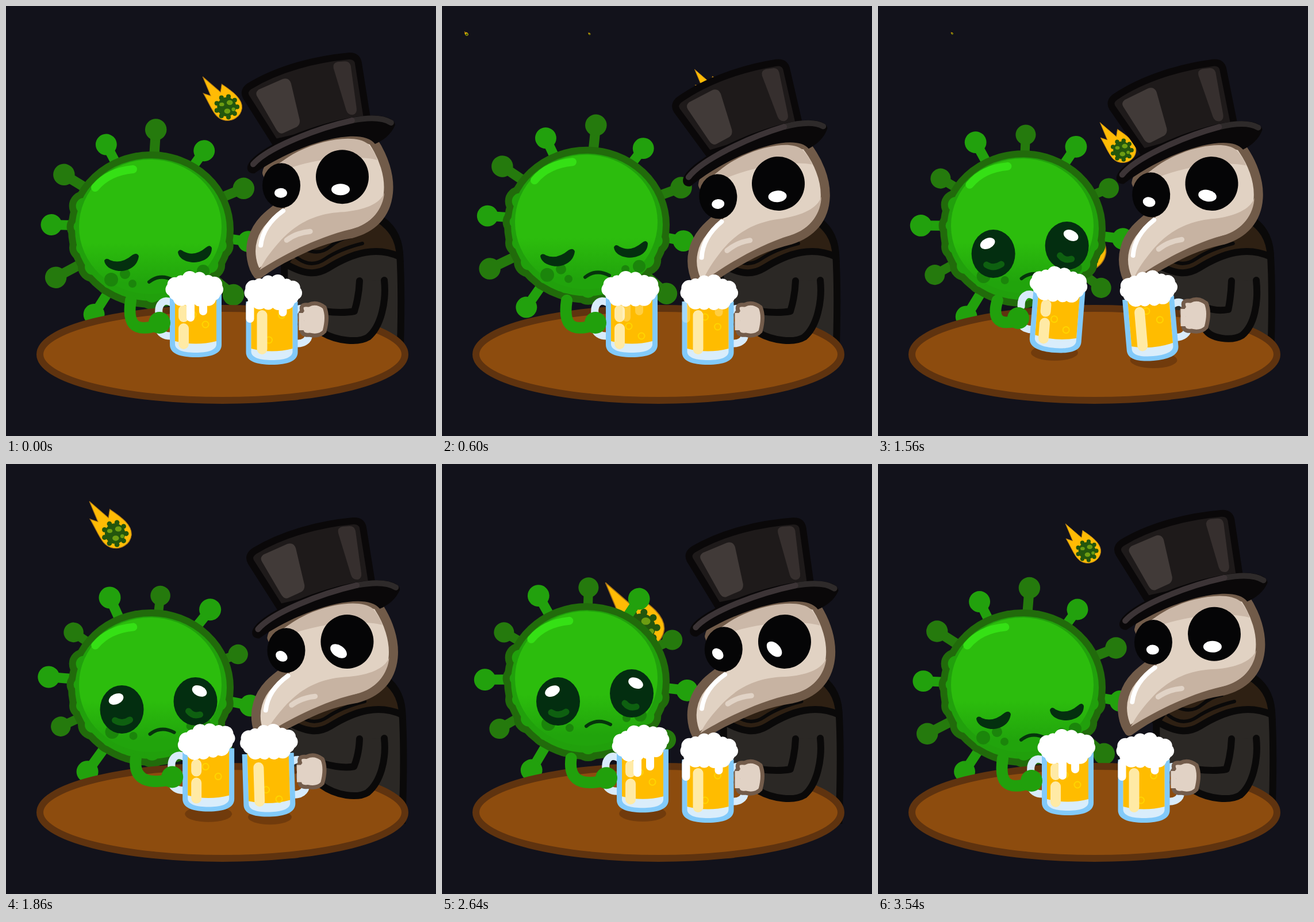
Animation, 748 px wide and 748 px high, one loop 3.6 s. Source, as an HTML page:

```html
<!DOCTYPE html>
<html>
<head>
<meta charset="utf-8">
<style>
html, body { margin: 0; width: 100%; height: 100%; overflow: hidden; background: #12121b; }
svg { display: block; width: 100vw; height: 100vh; }
.line { fill: none; stroke-linecap: round; stroke-linejoin: round; }
</style>
</head>
<body>
<svg viewBox="0 0 748 748">
  <defs>
    <linearGradient id="skin" x1="0" y1="0" x2="0" y2="1">
      <stop offset=".62" stop-color="#2cbd0d"/><stop offset=".92" stop-color="#21a40c"/>
    </linearGradient>
    <g id="meteor">
      <path d="M-39-49L-10-24L-8-37C10-25 26-13 25 2C23 17 9 24-3 22C-20 19-24 2-38-22L-26-18Z" fill="#ffbb05" stroke="#a46f16" stroke-width="1"/>
      <g id="core" fill="#23560d"><circle r="15.5"/></g>
      <g fill="#6d9d12"><ellipse cx="-8" cy="-4" rx="4" ry="3"/><ellipse cx="5" cy="-7" rx="5" ry="4"/><ellipse cx="1" cy="7" rx="5" ry="4"/><circle cx="11" cy="4" r="3"/></g>
    </g>
    <g id="blob"><ellipse cx="252" cy="389" rx="132" ry="124"/></g>
    <g id="foam" fill="#fff"><ellipse cx="-2" cy="-118" rx="42" ry="24"/></g>
    <g id="glass">
      <path d="M-42-95C-56-103-66-92-64-76M-64-52C-64-42-54-36-42-37" class="line" stroke="#d8ebfb" stroke-width="13"/>
      <path d="M-45-110H45V-22C45-6 27 0 0 0S-45-6-45-22Z" fill="#82cafa"/>
      <path d="M-36-110H36V-23C36-12 20-8 0-8S-36-12-36-23Z" fill="#d9edfb"/>
      <path d="M-36-112H36V-28Q0-19-36-28Z" fill="#ffbc00"/>
    </g>
  </defs>

  <g id="meteors"></g>

  <g id="virus">
    <g id="dark" fill="#257a0d" stroke="#257a0d"></g>
    <g id="light" fill="#22a10d" stroke="#22a10d"></g>
    <use href="#blob" fill="#216b0b" stroke="#216b0b" stroke-width="24"/>
    <use href="#blob" fill="#21a00c"/>
    <ellipse cx="251" cy="384" rx="124" ry="117" fill="url(#skin)"/>
    <path id="shine" d="M155 316Q178 288 221 284" class="line" stroke="#35e015" stroke-width="14"/>
    <g id="face">
      <g fill="#1b850b"><circle cx="183" cy="476" r="12"/><circle cx="207" cy="466" r="9"/><circle cx="220" cy="483" r="7"/><circle cx="343" cy="461" r="11"/><circle cx="319" cy="466" r="7"/></g>
      <path d="M249 480Q268 465 291 477" class="line" stroke="#06350c" stroke-width="6"/>
      <g id="closed" fill="#04300f">
        <path d="M171 443Q174 437 181 442Q200 450 220 433Q228 428 231 435C229 454 211 462 196 461C181 459 172 452 171 443Z"/>
        <path d="M299 428Q302 421 309 427Q328 437 348 420Q355 414 358 421C358 439 341 446 325 446C311 445 300 438 299 428Z"/>
      </g>
      <g id="open">
        <g fill="#032e10"><ellipse cx="200" cy="437" rx="38" ry="42"/><ellipse cx="328" cy="423" rx="38" ry="42"/></g>
        <g fill="#fff"><ellipse rx="13.5" ry="9" transform="translate(190 419)rotate(-25)"/><ellipse rx="13.5" ry="9" transform="translate(335 405)rotate(25)"/></g>
        <path d="M188 456Q201 464 214 455M316 440Q324 450 336 446" class="line" stroke="#0e6010" stroke-width="11"/>
      </g>
    </g>
  </g>

  <g id="torso" stroke="#0a0909" stroke-width="12">
    <path d="M484 440L486 620H685C688 540 688 480 685 430C683 400 668 380 650 370Z" fill="#2b2825"/>
    <path d="M485 448C520 468 540 468 560 456C605 428 645 418 685 436C684 402 668 385 650 372L520 400Z" fill="#2e2013"/>
    <path d="M505 437Q530 457 555 440T620 413M520 423Q545 434 563 419T598 402" class="line" stroke-width="6"/>
  </g>

  <ellipse cx="376.5" cy="606" rx="317.5" ry="80" fill="#8d4c0e" stroke="#5f330f" stroke-width="12"/>
  <g fill="#713b0c"><ellipse id="shadow0" rx="41" ry="14"/><ellipse id="shadow1" rx="41" ry="14"/></g>

  <g id="head">
    <path d="M638 234C657 262 668 295 665 325C661 364 636 387 600 396C553 404 526 417 496 432C468 445 450 458 438 467C428 454 422 428 429 405C437 376 460 360 478 347L454 290C460 250 590 215 638 234Z" fill="#e1d2c3" stroke="#715b49" stroke-width="16" stroke-linejoin="round"/>
    <path d="M462 290C490 245 600 214 630 240Q642 254 646 268C610 258 530 264 472 290Z" fill="#cbb8a8"/>
    <path d="M441 459C470 440 535 403 600 388C636 380 656 352 658 325C650 345 622 355 588 358C530 360 500 385 480 405C462 425 450 440 441 459Z" fill="#c7b3a2"/>
    <path d="M443 416C446 390 461 371 482 356" class="line" stroke="#fff" stroke-width="8"/>
    <path d="M488 407Q506 394 529 392" class="line" stroke="#e1d3c6" stroke-width="9"/>
    <ellipse cx="479" cy="312" rx="33" ry="39" fill="#050506"/>
    <ellipse cx="585" cy="297" rx="46" ry="47" fill="#050506"/>
    <g fill="#fff"><ellipse id="pupil0" cx="478" cy="325" rx="11" ry="8.5"/><ellipse id="pupil1" cx="582" cy="319" rx="16" ry="10"/></g>
    <path d="M468 237L418 158Q412 147 424 139C475 108 540 92 596 87Q610 86 613 98L629 200Z" fill="#1e1a1a" stroke="#0a0809" stroke-width="12" stroke-linejoin="round"/>
    <path d="M437 157Q433 150 440 145L481 127Q492 123 496 134L511 198Q512 206 506 210L482 221Q475 223 470 214Z" fill="#413a38"/>
    <path d="M570 108Q568 99 577 97L590 96Q598 96 600 104L610 178Q611 187 604 189Q595 190 592 181Z" fill="#362f2e"/>
    <path d="M420 279C425 252 520 208 600 194C650 185 677 194 677 207C670 224 656 234 642 240C617 207 505 240 432 291C423 291 419 286 420 279Z" fill="#0a0809"/>
    <g class="line" stroke-width="10"><path d="M602 199Q650 190 670 203" stroke="#2e2a2a"/><path d="M430 275C455 246 540 213 602 199" stroke="#3c3436"/></g>
  </g>

  <path id="sleeve" fill="#2b2825" stroke="#0a0909" stroke-width="12" stroke-linecap="round" stroke-linejoin="round"/>
  <g id="mug0"></g>
  <g id="mug1"></g>
  <g id="fist"><path d="M515 530Q511 518 526 520Q540 513 554 524Q561 540 554 566Q545 576 528 572Q513 574 514 560Q508 554 514 547Q508 538 515 530Z" fill="#e1d2c5" stroke="#735c4b" stroke-width="7"/><path d="M514 534V564" stroke="#e1d2c5" stroke-width="9"/></g>
  <g id="arm"><path class="line" stroke="#21a00c" stroke-width="20"/><circle r="19" fill="#21a00c"/></g>
</svg>
<script>
const LOOP = 3600, STEP = 60, RAD = Math.PI / 180;
const el = id => document.getElementById(id);
const set = (node, name, value) => node.setAttribute(name, value);
const move = (id, value) => set(el(id), 'transform', value);
const repeat = (n, draw) => Array.from({ length: n }, (_, i) => draw(i)).join('');
const circle = (x, y, r) => `<circle cx="${x}" cy="${y}" r="${r}"/>`;
const wave = (t, period) => Math.cos(2 * Math.PI * t / period);
const ease = u => (u = Math.max(0, Math.min(1, u)), u * u * (3 - 2 * u));
// rises from a to b, stays, falls from c to d
const bump = (t, a, b, c, d) => ease((t - a) / (b - a)) * ease((d - t) / (d - c));

const meteors = [
  { born: 3006, x: 278, speed: .1 },
  { born: 45, x: 386, speed: .1 },
  { born: 538, x: 42, speed: .1 },
  { born: 531, x: 256, speed: .053 },
  { born: 1542, x: 129, speed: .2 },
  { born: 1901, x: 150, speed: .12 }
];
const mugs = [
  { x: 330, y: 611, flip: 1, foam: 0, wind: [-23, -8, 4.5], clink: [38, -19, 0], back: 3060, slosh: -9,
    drips: 'M-9-105V-69M13-105V-80', shine: 'M-21-82V-70M-21-50V-23' },
  { x: 462.5, y: 624, flip: -1, foam: -7, wind: [17, -7, -5], clink: [-6, -31, -3], back: 2640, slosh: 0,
    drips: 'M-38-105V-80M19-105V-91', shine: 'M-17-86V-27' }
];

function spike(i) {
  const angle = (123.5 + 30.7 * i - 3.2 * Math.sin(Math.min(i, 7) * Math.PI / 7)) * RAD;
  const reach = 172 + 10 * Math.sin(angle) + 6 * (i % 2);
  const x = reach * Math.cos(angle), y = reach * Math.sin(angle);
  return `<path d="M${x * .65} ${y * .65}L${x} ${y}" stroke-width="17"/><g stroke="none">${circle(x, y, 18.5)}</g>`;
}
el('light').innerHTML = repeat(5, i => spike(2 * i));
el('dark').innerHTML = repeat(5, i => spike(2 * i + 1));

el('core').innerHTML += repeat(9, i => circle(17 * Math.cos(i * 40 * RAD), 17 * Math.sin(i * 40 * RAD), 3.8));
el('blob').innerHTML += repeat(11, i => {
  const a = (15 + 18.5 * i) * RAD;
  return circle(252 + 124 * Math.cos(a), 387 + 115 * Math.sin(a), 12 + 2 * Math.sin(i * 2));
});
el('foam').innerHTML += repeat(14, i => {
  const a = i * 2 * Math.PI / 14;
  return circle(-2 + 38 * Math.cos(a), -118 + 19 * Math.sin(a), 12 + 2 * Math.sin(i * 4));
});
el('meteors').innerHTML = repeat(meteors.length, () => '<use href="#meteor"/>');
mugs.forEach((m, i) => {
  el('mug' + i).innerHTML = `<use href="#glass" transform="scale(${m.flip} 1)"/>
    <g id="bubbles${i}" fill="none" stroke="#ffd500" stroke-width="2">${repeat(2, () => '<circle r="5.5"/>')}</g>
    <path d="${m.shine}" class="line" stroke="#ffeaa5" stroke-width="18"/>
    <path id="drips${i}" d="${m.drips}" class="line" stroke="#fff" stroke-width="14"/>
    <g id="foam${i}"><use href="#foam" transform="translate(0 ${m.foam})scale(${m.flip} 1)"/></g>`;
});

function drawMeteors(t) {
  meteors.forEach((m, i) => {
    const n = (t - m.born + LOOP) % LOOP / STEP;
    const fall = m.speed * n * n;
    const x = m.x + 10.8 * fall, y = 48 + 13 * fall;
    const size = x > 560 || y > 560 ? 0 : Math.min(1.65, 1.08 * m.speed * n);
    set(el('meteors').children[i], 'transform', `translate(${x} ${y})scale(${size})`);
  });
}

function drawVirus(t, lean) {
  const bob = 5.5 * wave(t, 1800) - 5.5;
  const turn = .3 - 2.8 * wave(t - 300, 1200) - 1.2 * wave(t, 1200);
  const pulse = wave(t - 300, LOOP);
  const slide = 4 - 4 * wave(t, 900);
  const awake = t >= 840 && t < 3060;
  move('virus', `translate(0 ${bob})`);
  move('dark', `translate(250 385)rotate(${turn})scale(${.975 + .045 * pulse})`);
  move('light', `translate(250 385)rotate(${turn})scale(${1.012 - .017 * pulse})`);
  move('shine', `translate(${slide} ${-.75 * slide})`);
  move('face', `translate(${2 * lean} ${-13 * lean})`);
  set(el('open'), 'visibility', awake ? 'visible' : 'hidden');
  set(el('closed'), 'visibility', awake ? 'hidden' : 'visible');
}

function drawDoctor(t, lean, wind) {
  const nod = bump((t + 300) % LOOP, 0, 900, 2940, LOOP);
  const x = 11 * lean - 8 * wind;
  move('head', `translate(${x} ${16 * nod - 4})rotate(${1.3 - 5.3 * nod + 5 * lean} 585 297)`);
  move('torso', `translate(${x / 2} 0)`);
  move('pupil0', `rotate(${45 * lean} 479 312)`);
  move('pupil1', `rotate(${45 * lean} 585 297)`);
}

function drawMug(m, i, t, wind) {
  const clink = bump(t, 1560, 2100, 2220, m.back);
  const mix = (k, c) => m.wind[k] * wind + m.clink[k] * c;
  const x = mix(0, clink), y = mix(1, clink * clink);
  move('mug' + i, `translate(${m.x + x} ${m.y + y})rotate(${mix(2, clink)})`);
  move('foam' + i, `translate(0 ${-7 * clink})rotate(${m.slosh * 4 * clink * (1 - clink)} 0 -110)`);
  set(el('drips' + i), 'opacity', t < LOOP / 2 ? 1 - ease(t / 900) : ease((t - 2340) / 300));
  [17, -5].forEach((bx, k) =>
    set(el('bubbles' + i).children[k], 'transform', `translate(${bx} ${-30 - (t / 15 + 27 + 17 * k + 29 * i) % 60})`));
  const ground = m.y - 8;
  move('shadow' + i, `translate(${m.x + x} ${ground + (613 - ground) * clink})scale(${Math.min(1, Math.hypot(x, y) / 12)})`);
  return [x, y];
}

function drawArms([lx, ly], [rx, ry]) {
  const [line, hand] = el('arm').children;
  set(line, 'd', `M${217 + .4 * lx} 512C${211 + .5 * lx} ${552 + 1.6 * ly} ${222 + .7 * lx} ${568 + 1.4 * ly} ${262 + lx} ${556 + ly}`);
  set(hand, 'transform', `translate(${267 + lx} ${551 + ly})`);
  move('fist', `translate(${rx} ${ry})`);
  const ex = rx * .2, ey = ry * .45;
  set(el('sleeve'), 'd', `M615 478Q614 505 ${606 + ex} ${531 + ey}Q${585 + ex} ${535 + ey} ${553 + rx} ${531 + ry}
    L${552 + rx} ${569 + ry}C${575 + ex} ${582 + ey} ${612 + ex} ${587 + ey} ${630 + ex} ${576 + ey}C${652 + ex} ${558 + ey} 662 515 658 477`);
}

function frame(now) {
  const t = Math.floor(now % LOOP / STEP) * STEP;
  const lean = bump(t, 1200, 2160, 2640, 3300), wind = bump(t, 1260, 1560, 1560, 1860);
  drawMeteors(t);
  drawVirus(t, lean);
  drawDoctor(t, lean, wind);
  drawArms(...mugs.map((m, i) => drawMug(m, i, t, wind)));
  requestAnimationFrame(frame);
}
frame(0);
</script>
</body>
</html>
```
